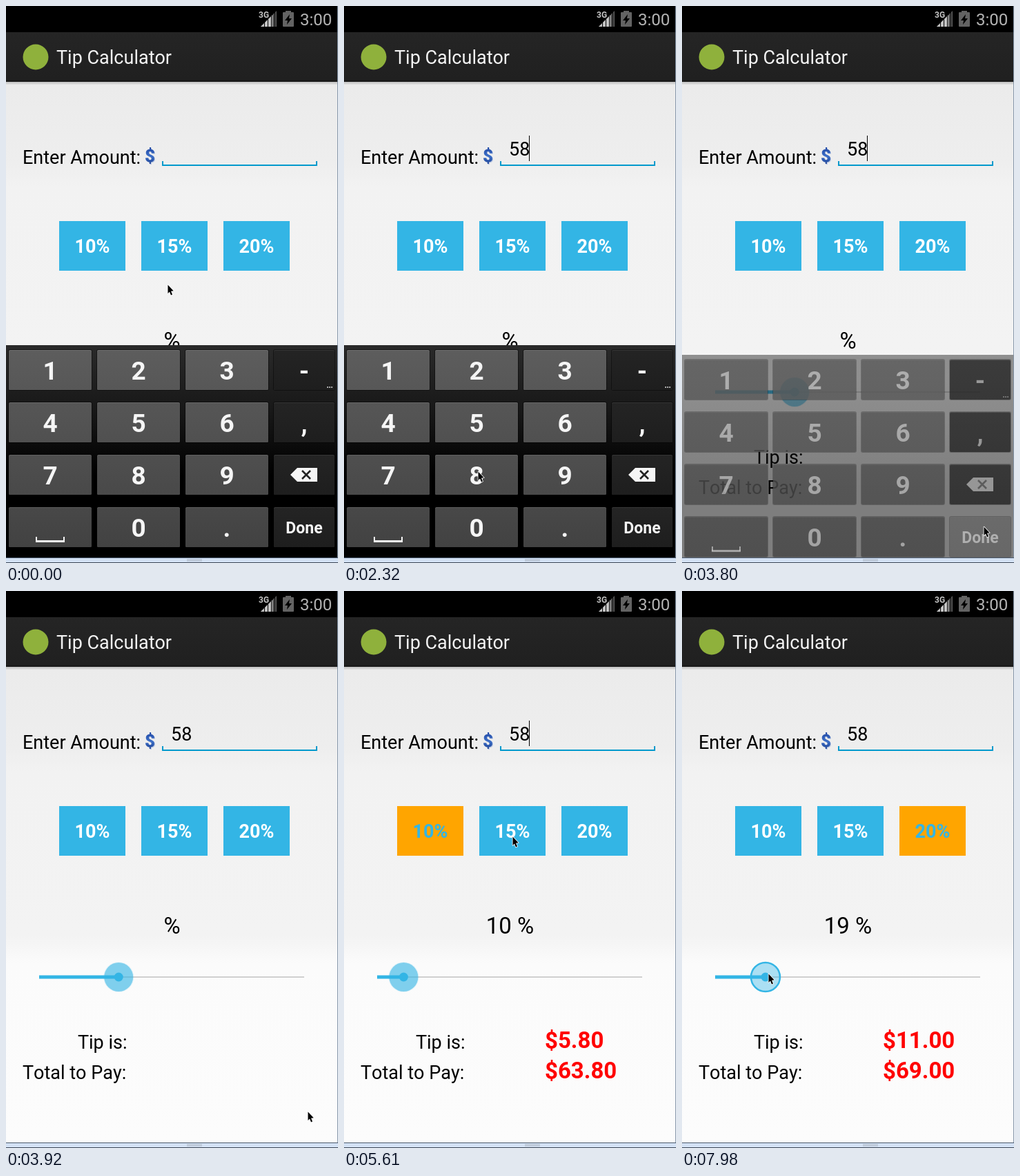
An HTML page with a canvas for the animation above (8 s loop, 481 by 808 pixels).

```html
<!DOCTYPE html>
<html lang="en">
<head>
<meta charset="utf-8">
<title>Tip Calculator</title>
<style>
  html, body { margin: 0; width: 100%; height: 100%; overflow: hidden; background: #000; }
  canvas { display: block; }
</style>
</head>
<body>
<canvas id="stage" width="481" height="808"></canvas>
<script>
const c = document.getElementById('stage').getContext('2d');
const LOOP = 8000, STEP = 135;
const BLUE = '#33b5e5', ORANGE = '#ffa500', INK = '#f5f5f5';
const BILL = 58, RATES = [10, 15, 20];
const RATE_TIMES = [4870, 5880, 6750];
const DRAG = 7680;
const KEYS = ['1', '2', '3', '-', '4', '5', '6', ',', '7', '8', '9', 'del', 'space', '0', '.', 'Done'];

// Pointer trips: start, end, destination
const TRIPS = [
  [150, 1050, 189, 671],
  [1050, 1320, 195, 624],
  [1760, 2040, 194, 675],
  [2320, 3130, 437, 755],
  [3920, 4730, 122, 352],
  [5020, 5610, 244, 356],
  [5880, 6480, 362, 350],
  [6750, 7550, 132, 555],
  [DRAG, 7980, 125, 555]
];

const between = (t, a, b) => t >= a && t < b;
const smooth = p => p * p * (3 - 2 * p);

function progress(t, a, b) {
  const n = Math.round((b - a) / STEP);
  const p = Math.min(1, Math.max(0, (t - a) / (b - a)));
  return Math.floor(p * n + 1e-6) / n;
}

function pointerAt(t) {
  let x = 234, y = 404;
  for (const [a, b, toX, toY] of TRIPS) {
    const e = smooth(progress(t, a, b));
    x += (toX - x) * e;
    y += (toY - y) * e;
  }
  return [x, y];
}

function entryAt(t) {
  if (t >= 2320) return [String(BILL), 2320];
  return t >= 1760 ? ['5', 1760] : ['', 150];
}

function resultAt(t) {
  const chosen = RATE_TIMES.filter(start => t >= start).length - 1;
  if (chosen < 0) return { chosen, percent: 30 };
  const dragged = t >= DRAG;
  const percent = dragged ? Math.round((pointerAt(t)[0] - 52) / 3.84) : RATES[chosen];
  const exact = BILL * percent / 100;
  return { chosen, percent, tip: dragged ? Math.floor(exact) : exact };
}

function rect(x, y, w, h, fill) {
  c.fillStyle = fill;
  c.fillRect(x, y, w, h);
}

function box(x, y, w, h, r, fill) {
  c.fillStyle = fill;
  c.beginPath();
  c.roundRect(x, y, w, h, r);
  c.fill();
}

function circle(x, y, r, fill) {
  c.fillStyle = fill;
  c.beginPath();
  c.arc(x, y, r, 0, 2 * Math.PI);
  c.fill();
}

function poly(points, fill) {
  c.beginPath();
  for (const [x, y] of points) c.lineTo(x, y);
  c.closePath();
  c.fillStyle = fill;
  c.fill();
}

function text(s, x, y, size, fill, align = 'left', weight = 400) {
  c.font = `${weight} ${size}px Roboto, sans-serif`;
  c.fontKerning = 'none';
  c.textAlign = align;
  c.fillStyle = fill;
  c.fillText(s, x, y);
}

function fade(y0, y1, ...stops) {
  const g = c.createLinearGradient(0, y0, 0, y1);
  for (const [y, color] of stops) g.addColorStop((y - y0) / (y1 - y0), color);
  return g;
}

function drawBars() {
  rect(0, 0, 480, 38, '#000');
  poly([[369, 30], [392, 7], [392, 30]], '#555');
  poly([[369, 30], [386, 13], [386, 30]], '#c4c4c4');
  for (let x = 374; x < 392; x += 5) rect(x, 6, 1, 25, '#000');
  rect(367, 7, 14, 11, '#000');
  text('3G', 366, 17, 12, '#c4c4c4', 'left', 700);

  rect(405, 7, 8, 3, '#636363');
  box(401, 9, 16, 21, 1, '#636363');
  poly([[411, 12], [404, 21], [408, 21], [407, 27], [414, 18], [410, 18]], '#000');
  text('3:00', 426, 28, 24, '#b4b4b4');

  rect(0, 38, 480, 72, fade(38, 110, [38, '#252525'], [107, '#202020'], [110, '#151515']));
  circle(43, 74, 18.5, '#8fb13c');
  text('Tip Calculator', 73, 84, 27, '#f3f3f3');
}

function drawForm(t) {
  rect(0, 110, 480, 690, fade(110, 800, [110, '#ebebeb'], [228, '#eee'], [262, '#f2f2f2'],
    [500, '#f3f3f3'], [540, '#fbfbfb'], [800, '#fcfcfc']));
  rect(0, 110, 480, 4, fade(110, 114, [110, '#bebebe'], [114, '#e2e2e2']));

  drawEntry(t);

  const { chosen, percent, tip } = resultAt(t);
  RATES.forEach((rate, i) => {
    const x = 77 + 119 * i, on = i === chosen;
    rect(x, 312, 96, 72, on ? ORANGE : BLUE);
    text(rate + '%', x + 48, 358, 27, on ? BLUE : '#fff', 'center', 700);
  });

  text(chosen < 0 ? '%' : percent + ' %', 240.5, 497, 33, '#000', 'center');
  drawSlider(percent, t >= DRAG);

  text('Tip is:', 175.5, 664, 27, '#000', 'right');
  text('Total to Pay:', 24, 708, 27, '#000');
  if (chosen >= 0) {
    text('$' + tip.toFixed(2), 291, 663, 33, '#f00', 'left', 700);
    text('$' + (BILL + tip).toFixed(2), 291, 707, 33, '#f00', 'left', 700);
  }
}

function drawEntry(t) {
  text('Enter Amount:', 24, 229, 27, '#000');
  text('$', 202, 227, 26, '#b9c6df', 'left', 900);
  text('$', 201, 226, 26, fade(205, 231, [205, '#2148a4'], [218, '#3d70c8'], [231, '#17398c']), 'left', 900);

  rect(226, 230, 225, 2, '#09c');
  for (const x of [226, 449]) rect(x, 225, 2, 6, '#09c');

  // The caret restarts its blink with every typed digit
  const [amount, since] = entryAt(t);
  text(amount, 239, 217, 27, '#000');
  if (t >= since && (t - since) % 1000 < 500) rect(238 + 15 * amount.length, 188, 1, 37, '#000');
}

function drawSlider(percent, held) {
  const x = 48 + 3.84 * percent, y = 560;
  rect(48, 559, 384, 2, '#d0d0d0');
  rect(48, 557.5, x - 48, 5, BLUE);
  if (held) {
    circle(x, y, 21, 'rgba(51,181,229,0.4)');
    c.lineWidth = 2.5;
    c.strokeStyle = BLUE;
    c.stroke();
  } else {
    circle(x, y, 22, 'rgba(51,181,229,0.12)');
    circle(x, y, 21, 'rgba(51,181,229,0.56)');
  }
  circle(x, y, 6.5, BLUE);
}

function drawKey(name, i, lit) {
  const col = i % 4, row = i >> 2, side = col === 3;
  const x = 4 + 128 * col, y = 499 + 76 * row, w = side ? 88 : 120, mid = x + w / 2;
  const gray = v => `rgb(${v},${v},${v})`;
  const tone = lit ? 104 : side ? 36 : 93 - 7 * row;
  box(x - 1, y - 1, w + 2, 60, 3, 'rgba(0,0,0,0.45)');
  box(x, y, w, 58, 2, gray(tone + 18));
  box(x, y + 1, w, 57, 2, fade(y, y + 58, [y, gray(tone)], [y + 58, gray(tone - 6)]));

  if (name === 'del') drawDelete(mid, y + 29);
  else if (name === 'space') {
    rect(43, 775, 42, 3, INK);
    for (const end of [43, 83]) rect(end, 770, 2, 6, INK);
  } else if (name === 'Done') text(name, mid, 765, 23, INK, 'center', 700);
  else text(name, mid, y + 43, 37, INK, 'center', 700);
  if (name === '-') for (let d = 465; d < 473; d += 3) rect(d, 552, 2, 2, '#aaa');
}

function drawDelete(x, y) {
  poly([[x - 20, y], [x - 10, y - 10], [x + 19, y - 10], [x + 19, y + 10], [x - 10, y + 10]], INK);
  c.strokeStyle = '#222';
  c.lineWidth = 2.6;
  c.beginPath();
  for (const s of [-1, 1]) {
    c.moveTo(x - 3, y - 6 * s);
    c.lineTo(x + 9, y + 6 * s);
  }
  c.stroke();
}

function drawKeyboard(t) {
  const hidden = progress(t, 3680, 3920);
  if (hidden === 1) return;
  const pressed = between(t, 1620, 1890) ? '5' : t >= 3530 ? 'Done' : '';
  c.save();
  c.beginPath();
  c.rect(0, 492, 480, 308);
  c.clip();
  c.globalAlpha = 1 - hidden;
  c.translate(0, 28 * hidden);
  rect(0, 492, 480, 308, fade(492, 800, [492, '#2a2a2a'], [590, '#171717'], [682, '#000']));
  KEYS.forEach((name, i) => drawKey(name, i, name === pressed));
  c.restore();
}

function drawEdges() {
  rect(480, 0, 1, 808, '#8797aa');
  rect(0, 800, 481, 1, '#4c5b6e');
  rect(0, 801, 481, 6, '#d3e1f4');
  rect(262, 802, 22, 4, '#bfcbdc');
  rect(0, 807, 481, 1, '#3c4654');
}

function drawPointer(t) {
  c.save();
  c.translate(...pointerAt(t).map(Math.round));
  c.lineJoin = 'round';
  c.lineWidth = 1.6;
  c.strokeStyle = '#fff';
  const arrow = [[0.5, 0.5], [0.5, 13], [3, 10.5], [5, 15.5], [7, 14.5], [5, 9.7], [8.7, 9.3]];
  poly(arrow, '#000');
  c.stroke();
  poly(arrow, '#000');
  c.restore();
}

function draw(t) {
  drawBars();
  drawForm(t);
  drawKeyboard(t);
  drawEdges();
  drawPointer(t);
}

const start = performance.now();
function tick() {
  draw((performance.now() - start) % LOOP);
  requestAnimationFrame(tick);
}
tick();
</script>
</body>
</html>
```
